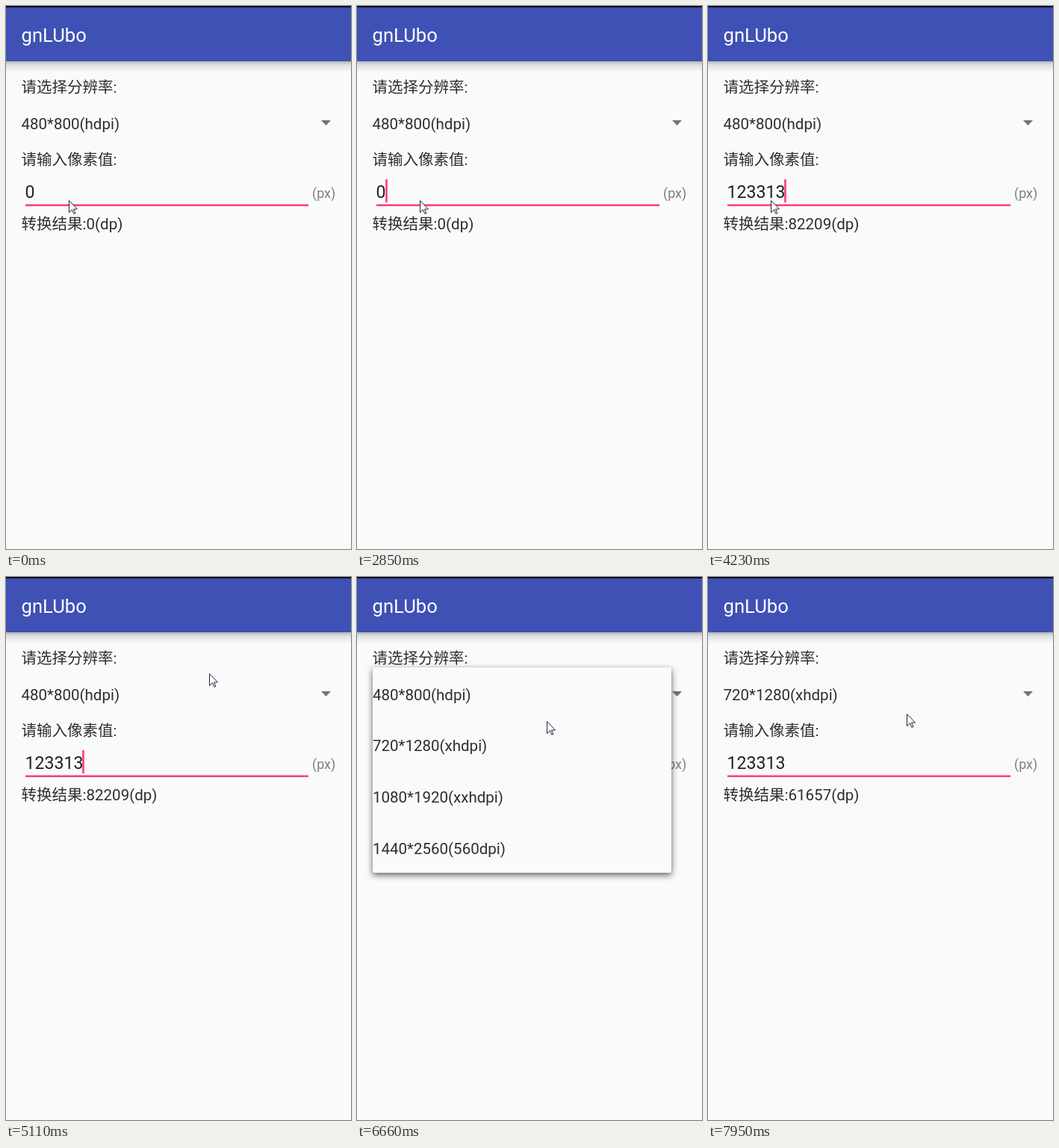
These frames come from a looping animation (462 by 727 pixels, 8000 ms). An HTML page:

```html
<!DOCTYPE html>
<html lang="zh-CN">
<head>
<meta charset="utf-8">
<title>gnLUbo</title>
<style>
  html, body { margin: 0; width: 100%; height: 100%; overflow: hidden; background: #f9fbfa; }
  svg { display: block; width: 462px; height: 727px; }
  text { font-family: Roboto, "Noto Sans CJK SC", "Noto Sans CJK", sans-serif; font-size: 20.53px; fill: #2d2e2e; white-space: pre; }
  #panel { filter: drop-shadow(0 3px 4px rgba(0, 0, 0, .62)); }
</style>
</head>
<body>
<svg viewBox="0 0 462 727">
  <defs>
    <linearGradient id="shade" x2="0" y2="1">
      <stop offset="0" stop-color="#000" stop-opacity=".27"/>
      <stop offset=".35" stop-color="#000" stop-opacity=".1"/>
      <stop offset="1" stop-color="#000" stop-opacity="0"/>
    </linearGradient>
  </defs>
  <rect width="462" height="727" fill="#f9fbfa"/>
  <rect id="trace" x="13" y="119" width="419" height="288" fill="#f9f9f9"/>
  <rect y="74" width="462" height="15" fill="url(#shade)"/>
  <rect width="462" height="74" fill="#3f51b5"/>
  <rect width="462" height="1.7" fill="#000"/>
  <text x="20.5" y="48" style="font-size:25.67px;fill:#fff">gnLUbo</text>

  <text x="20.5" y="116">请选择分辨率:</text>
  <text id="choice" x="20.5" y="164.7"></text>
  <path d="M422 153h13l-6.5 7z" fill="#737474"/>
  <text x="20.5" y="212.7">请输入像素值:</text>
  <text id="pixels" x="25.6" y="256.8" style="font-size:23.1px;fill:#212222"></text>
  <rect id="caret" y="232" width="2.7" height="31" fill="#ff4081"/>
  <rect x="26" y="265.4" width="379" height="2.6" fill="#ff4081"/>
  <text x="410" y="256.8" style="font-size:17.97px;fill:#7d7e7e">(px)</text>
  <text id="result" x="20.5" y="298.8"></text>

  <g id="popup">
    <rect id="panel" x="21" y="121" width="400" height="275" rx="2" fill="#fafafa"/>
    <rect id="pressed" x="21" y="189.75" width="400" height="68.75" fill="#eee"/>
    <g id="items"></g>
  </g>
  <path id="pointer" d="M.5.5v16l4-3.8 2.4 5.6 2-.9-2.4-5.4h5z" fill="#fff" stroke="#25253c"/>
</svg>
<script>
const LOOP = 8000;
const FRAME = 141.9;
const BLINK = 490;
const FADE = 205;
const FIRST_KEY = 3130, KEY_GAP = 195;
const OPEN = 6174, PRESS = 6800, CLOSE = 7031, REFOCUS = 7240;
const KEYS = '123313';
const LAST_KEY = FIRST_KEY + KEY_GAP * (KEYS.length - 1);

const OPTIONS = ['480*800(hdpi)', '720*1280(xhdpi)', '1080*1920(xxhdpi)', '1440*2560(560dpi)'];
const START = { x: 84, y: 260 };
const MOVES = [
  { from: 4300, to: 4950, x: 272, y: 129 },
  { from: 5900, to: 6240, x: 270, y: 161 },
  { from: 6240, to: 6810, x: 238, y: 224 },
  { from: 7240, to: 7940, x: 266, y: 183 }
];

const $ = id => document.getElementById(id);
const clamp = v => Math.min(1, Math.max(0, v));
const ramp = (t, from, to) => clamp((t - from) / (to - from));
const smooth = v => v * v * (3 - 2 * v);
const show = (id, on) => $(id).setAttribute('visibility', on ? 'visible' : 'hidden');
function write(id, text) {
  if ($(id).textContent !== text) $(id).textContent = text;
}

OPTIONS.forEach((label, row) => {
  const item = document.createElementNS('http://www.w3.org/2000/svg', 'text');
  item.setAttribute('x', 21);
  item.setAttribute('y', 164.6 + row * 68.75);
  item.textContent = label;
  $('items').append(item);
});

function typedValue(t) {
  const count = Math.floor((t - FIRST_KEY) / KEY_GAP) + 1;
  return count > 0 ? KEYS.slice(0, count) : '0';
}

// Blinking restarts with each key and on refocus, and pauses while the list is open.
function caretVisible(t) {
  if (t >= REFOCUS) return t - REFOCUS < BLINK;
  if (t >= FIRST_KEY && t < LAST_KEY) return true;
  const since = t < FIRST_KEY ? t + 575 : Math.min(t, OPEN) - LAST_KEY;
  return Math.floor(since / BLINK) % 2 === 0;
}

function pointerAt(t) {
  return MOVES.reduce((p, move) => {
    const k = smooth(ramp(t, move.from, move.to));
    return { x: p.x + (move.x - p.x) * k, y: p.y + (move.y - p.y) * k };
  }, START);
}

function draw(t) {
  const sampled = Math.floor(t / FRAME) * FRAME;
  const value = typedValue(t);
  const chosen = sampled < CLOSE ? 0 : 1;
  write('pixels', value);
  write('choice', OPTIONS[chosen]);
  write('result', `转换结果:${Math.round(value / (chosen ? 2 : 1.5))}(dp)`);

  show('caret', caretVisible(t));
  $('caret').setAttribute('x', 25.3 + value.length * 12.8);

  const open = ramp(sampled, OPEN, OPEN + FADE) - ramp(sampled, CLOSE, CLOSE + FADE);
  const scale = .9 + .1 * open;
  $('popup').setAttribute('opacity', open);
  $('popup').setAttribute('transform', `translate(221 121) scale(${scale}) translate(-221 -121)`);
  show('pressed', sampled >= PRESS);
  show('trace', sampled >= OPEN + FADE);

  const { x, y } = pointerAt(sampled);
  $('pointer').setAttribute('transform', `translate(${Math.round(x)} ${Math.round(y)})`);
}

function tick(now) {
  draw(now % LOOP);
  requestAnimationFrame(tick);
}
draw(0);
requestAnimationFrame(tick);
</script>
</body>
</html>
```
